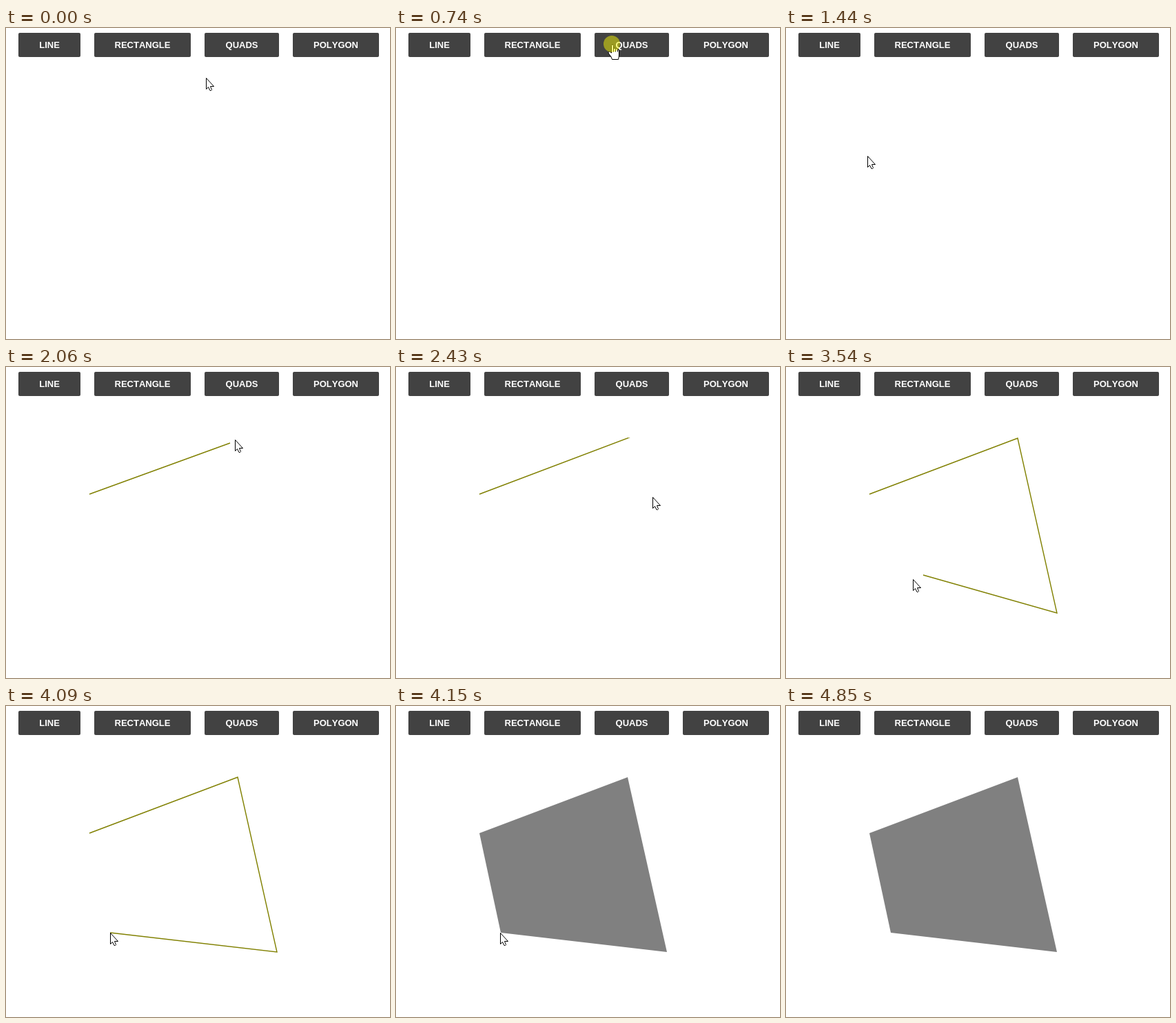
Animation, 557 px wide and 450 px high, one loop 5400 ms. Source, as an HTML page with a canvas:

```html
<!DOCTYPE html>
<html lang="en">
<head>
<meta charset="utf-8">
<title>Drawing a quad</title>
<style>
  html, body { margin: 0; width: 100%; height: 100%; overflow: hidden; background: #fff; }
  nav { position: absolute; left: 18px; top: 7px; display: flex; gap: 20px; }
  nav span {
    height: 35px; border-radius: 2px; background: #424242; color: #fff; text-align: center;
    font: bold 13px/35px "Liberation Sans", Arial, sans-serif; font-kerning: none;
  }
  canvas { position: absolute; left: 0; top: 0; pointer-events: none; }
</style>
</head>
<body>
<nav>
  <span style="width:90px">LINE</span>
  <span style="width:140px">RECTANGLE</span>
  <span style="width:108px">QUADS</span>
  <span style="width:125px">POLYGON</span>
</nav>
<canvas width="557" height="450"></canvas>
<script>
const LOOP = 5400, STEP = 77, DRAW_AT = 1670, FILL_AT = 4150, EXIT_AT = 4850;
const ctx = document.querySelector('canvas').getContext('2d');

const corners = [[121, 184], [336, 103], [393, 356], [152, 328]];
const clicks = [740, 1520, 2200, 2980];

// Each move follows a quadratic curve from the last resting point, easing out by a power.
const home = [290, 72];
const moves = [
  { start: 70, end: 510, bend: [215, -35], to: [313, 23], power: 2 },
  { start: 910, end: 1440, bend: [200, 112], to: [118, 185], power: 2 },
  { start: 1670, end: 2200, bend: [241, 171], to: [335, 103], power: 3 },
  { start: 2370, end: 2890, bend: [429, 301], to: [392, 356], power: 2 },
  { start: 3130, end: 4150, bend: [231, 254], to: [151, 328], power: 3 },
  { start: 4470, end: 4850, bend: [330, 400], to: [559, 450], power: 1 },
];

const arrow = new Path2D('M.5 .5V16.5L3.5 13.5 6 18.5H7.5L8.5 17.5 6.5 12.5H11.5Z');
const hand = new Path2D('M-.5 13V2.5Q-.5 1 1 1T2.5 2.5V7Q4 5 5.5 7 7.5 6 8.5 8 10.5 7.5 10.5 10V16' +
  'Q10.5 18 9.5 22.5H.5Q0 19-4.5 14-6 11.5-4 11-2.5 11-.5 13ZM2.5 7V11.5M5.5 7V11.5M8.5 8V11.5');

const moveAt = t => moves.findLastIndex(m => m.start <= t);

function pointerAt(t) {
  const i = moveAt(t);
  if (i < 0) return home;
  const { start, end, bend, to, power } = moves[i];
  const from = i ? moves[i - 1].to : home;
  const gaps = Math.round((end - start) / STEP);
  const step = Math.min(gaps, Math.floor((t - start) / (end - start) * gaps + 1e-6)) + 1;
  const left = (1 - step / (gaps + 1)) ** power, done = 1 - left;
  return to.map((v, k) => Math.round(left * left * from[k] + 2 * left * done * bend[k] + done * done * v));
}

function drawShape(t) {
  if (t < DRAW_AT) return;
  const filled = t >= FILL_AT;
  const placed = clicks.filter(c => c <= t).length - 1;
  // The loose end trails the pointer by one step.
  const points = filled ? corners : [...corners.slice(0, placed), pointerAt(t - STEP - 1)];
  ctx.beginPath();
  points.forEach(p => ctx.lineTo(...p));
  if (filled) {
    ctx.fillStyle = '#808080';
    ctx.fill();
  } else {
    ctx.strokeStyle = '#808000';
    ctx.lineWidth = 1.4;
    ctx.stroke();
  }
}

function drawPointer(t) {
  if (t >= EXIT_AT) return;
  const [x, y] = pointerAt(t);
  const hover = document.elementFromPoint(x, y)?.tagName === 'SPAN';
  const shape = hover ? hand : arrow;
  ctx.save();
  ctx.translate(x, y);
  ctx.fillStyle = '#fff';
  ctx.strokeStyle = '#000';
  ctx.lineWidth = 1;
  ctx.fill(shape);
  ctx.stroke(shape);
  // A click glows until the next move begins.
  const rested = moves[moveAt(t)]?.end;
  if (clicks.some(c => c >= rested && c <= t)) {
    ctx.fillStyle = 'rgba(255, 255, 0, .47)';
    ctx.beginPath();
    ctx.arc(0, 0, 12, 0, 2 * Math.PI);
    ctx.fill();
  }
  ctx.restore();
}

function render() {
  const t = performance.now() % LOOP;
  ctx.clearRect(0, 0, 557, 450);
  drawShape(t);
  drawPointer(t);
  requestAnimationFrame(render);
}
render();
</script>
</body>
</html>
```
